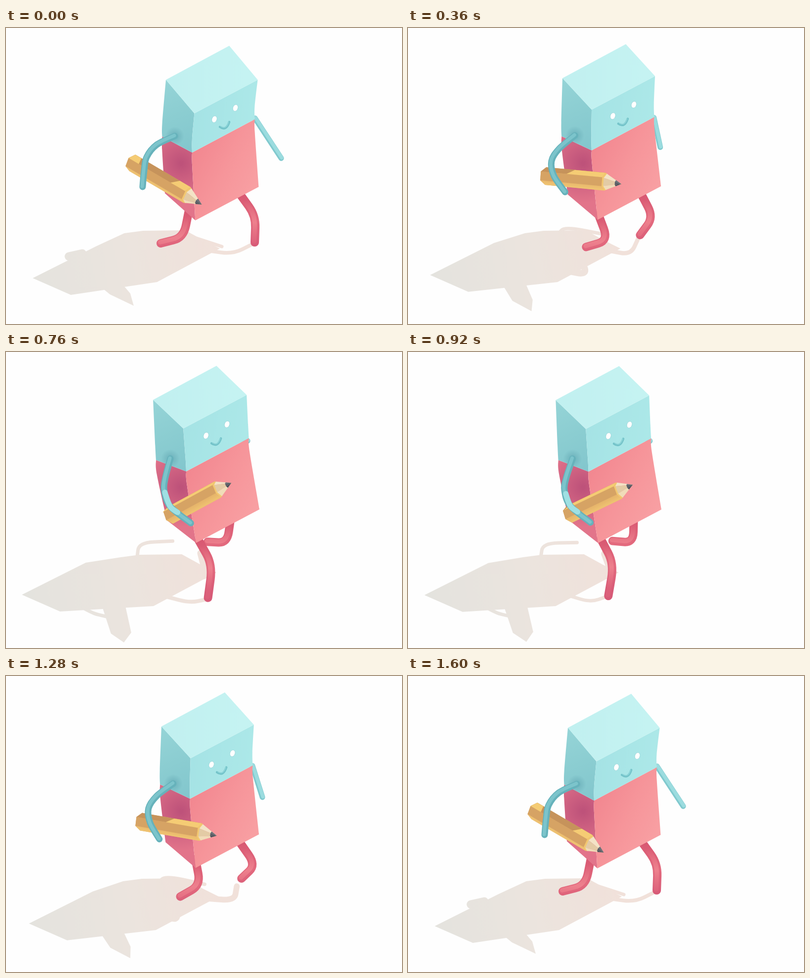
An HTML page with a canvas that plays this animation: 800x600 px, repeating every 1640 ms.

```html
<!DOCTYPE html>
<html lang="en">
<head>
<meta charset="utf-8">
<title>Walking eraser</title>
<style>
html, body { margin: 0; width: 100%; height: 100%; overflow: hidden; background: #fefefe; }
canvas { display: block; width: 800px; height: 600px; }
</style>
</head>
<body>
<canvas id="stage" width="800" height="600"></canvas>
<script>
const g = document.getElementById('stage').getContext('2d');
const STEP = 40, STEPS = 41, CYCLE = 1600;
const { sin, cos, PI } = Math;

const clamp = v => Math.max(0, Math.min(1, v));
const mix = (a, b, k) => a + (b - a) * k;
const lerp = (p, q, k) => [mix(p[0], q[0], k), mix(p[1], q[1], k)];
// Moves points along one direction by the sway u, from 0 (upright) to 1 (leaning).
const lean = (pts, [dx, dy], u) => pts.map(([x, y]) => [x + dx * u, y + dy * u]);
const shift = (pts, x, y) => lean(pts, [x, y], 1);

function ramp(a, b, ...colors) {
  const r = g.createLinearGradient(...a, ...b);
  colors.forEach((c, i) => r.addColorStop(i / (colors.length - 1), c));
  return r;
}

function glow([x, y], radius, inner, outer) {
  const r = g.createRadialGradient(x, y, 3, x, y, radius);
  r.addColorStop(0, inner);
  r.addColorStop(1, outer);
  return r;
}

function poly(pts, fill) {
  g.beginPath();
  pts.forEach(p => g.lineTo(...p));
  g.closePath();
  g.fillStyle = fill;
  g.fill();
}

function stroke(color, width) {
  g.strokeStyle = color;
  g.lineWidth = width;
  g.stroke();
}

function curve(p) {
  for (let i = 0; i < p.length - 1; i++) {
    const a = p[i - 1] || p[i], b = p[i], c = p[i + 1], d = p[i + 2] || c;
    g.bezierCurveTo(b[0] + (c[0] - a[0]) / 6, b[1] + (c[1] - a[1]) / 6,
      c[0] - (d[0] - b[0]) / 6, c[1] - (d[1] - b[1]) / 6, ...c);
  }
}

function tube(p, color, width) {
  g.beginPath();
  g.moveTo(...p[0]);
  curve(p);
  stroke(color, width);
}

// Two straight parts joined by a rounded corner.
function bent([a, b, c], color, width) {
  g.beginPath();
  g.moveTo(...a);
  g.lineTo(...lerp(b, a, 0.45));
  g.quadraticCurveTo(...b, ...lerp(b, c, 0.45));
  g.lineTo(...c);
  stroke(color, width);
}

// One step rule serves both legs, half a cycle apart.
const nearLeg = { phase: 0, hip: [383, 376], knee: [14, 52], foot: [-19, 84], twist: 8 };
const farLeg = { phase: PI, hip: [467, 338], knee: [18, 46], foot: [-9, 71], twist: 0 };

function pose({ phase, hip, knee, foot, twist }, angle) {
  const a = angle + phase, c = cos(a), s = sin(a), c2 = cos(2 * a);
  const x = hip[0] - 10 * c - 3.5 * c2, y = hip[1] - twist * (0.75 * c - 0.4 * s);
  return {
    lift: 13 * (1 + cos(a - PI / 6)),
    joints: [
      [x, y],
      [x + knee[0] - 19 * c + 3 * s - 6 * c2, y + knee[1] + 3 * c],
      [x + foot[0] - 38 * c, y + foot[1] + 26.5 * cos(a - 3.4) + twist * c2]]
  };
}

function leg({ joints }) {
  const y = joints[0][1];
  bent(joints, ramp([0, y], [0, y + 105], '#d85872', '#e36a7e', '#d75a77'), 17);
  bent(shift(joints, -1, -2), ramp([0, y + 12], [0, y + 100],
    'rgba(242,138,148,0)', 'rgba(242,138,148,.7)', 'rgba(230,110,130,.3)'), 9);
}

function legShadow({ joints, lift }, tone) {
  const heights = [113, 78 - 0.4 * lift, lift];
  bent(joints.map(([x, y], i) => [x - 0.6 * heights[i], y + heights[i]]), tone, 7 + lift * 0.3);
}

function shadow(u, legs) {
  const tone = ramp([50, 510], [430, 430], '#e4e3de', '#ebe4de', '#f1e1da');
  poly([
    ...lean([[109, 526], [32, 492], [161, 427]], [22, 15], u),
    ...lean([[232, 416], [270, 411], [355, 410], [393, 431], [425, 447], [298, 515]], [7, 0], u)], tone);
  const [a, b] = lean([[195, 518], [241, 514]], [-7, 4], u);
  const [c, d] = lean([[212, 571], [253, 569]], [-2, -31], u);
  const [tip] = lean([[238, 589]], [20, -26], u);
  poly([a, c, tip, d, b], tone);
  bent([[mix(264, 330, u), 420], [mix(268, 350, u), mix(386, 415, u)], [mix(336, 436, u), mix(383, 443, u)]], tone, 7);
  tube(lean([[150, 516], [178, 530], [206, 537]], [45, -20], u), tone, 7);
  tube(lean([[190, 472], [163, 478]], [-36, -15], u), tone, 17);
  legs.forEach(l => legShadow(l, tone));
}

function panel(left, right, fill) {
  g.beginPath();
  g.moveTo(...left[0]);
  curve(left);
  g.lineTo(...right[right.length - 1]);
  curve(right.slice().reverse());
  g.closePath();
  g.fillStyle = fill;
  g.fill();
}

// Upper and lower half of a bending edge, smooth at the seam.
function halves(a, b, c) {
  const x = (c[0] - a[0]) * 0.06, y = (c[1] - a[1]) * 0.12;
  return [[a, [b[0] - x, b[1] - y], b], [b, [b[0] + x, b[1] + y], c]];
}

function body(u) {
  const [A, B] = lean([[297, 97], [425, 28]], [26, 8], u);
  const [C, D] = lean([[486, 87], [358, 155]], [22.5, 18], u);
  const [E] = lean([[303, 219]], [12.5, 1], u);
  const [F, G] = lean([[364, 242], [490.5, 174.5]], [12, 10.5], u);
  const [H, I] = lean([[384, 387], [512, 319]], [-1.5, 3], u);
  const [J] = lean([[325, 341]], [-4, -6], u);
  const [l1, l2] = halves(A, E, J), [m1, m2] = halves(D, F, H), [r1, r2] = halves(C, G, I);
  panel(l2, m2, glow([354, 274], 80, '#be527a', '#e2748a'));
  panel(m2, r2, ramp(F, I, '#f28790', '#f6959a', '#f8a0a3'));
  panel(l1, m1, ramp(A, F, '#95d4d7', '#8bcdd1', '#82c6cd'));
  panel(m1, r1, ramp(D, G, '#a5e3e5', '#ace8e8'));
  poly([A, B, C, D], ramp(A, C, '#c1f0f0', '#c5f3f2'));
}

function face(u) {
  const [e1, e2, a, b, c] = lean([[404, 169.5], [446.5, 146.5], [415, 185], [428, 194], [434, 175]], [17, 15.5], u);
  for (const [x, y] of [e1, e2]) {
    g.beginPath();
    g.ellipse(x, y, 5, 6.8, 0.35, 0, 7);
    g.fillStyle = '#fff';
    g.fill();
    stroke('rgba(110,185,192,.4)', 1);
  }
  g.beginPath();
  g.moveTo(...a);
  g.quadraticCurveTo(...b, ...c);
  stroke('#74c3c9', 4.5);
  g.beginPath();
  g.moveTo(a[0] + 2, a[1] - 1);
  g.quadraticCurveTo(b[0], b[1] - 3, c[0] - 1, c[1]);
  stroke('#8dd4d8', 1.8);
}

function pencil(u) {
  const len = mix(145, 169, u), yellow = '#f5cc74';
  // Four visible corners of a hexagon that rolls with the sway
  const corners = [-90, -30, 30, 90].map(d => {
    const a = (d + 30 * u - 15) * PI / 180;
    return { v: 18 * sin(a) - 1.5, s: 5 - 12 * cos(a) };
  });
  const back = corners.map(({ s, v }) => [s, v]);
  const front = corners.map(({ s, v }) => [0.77 * len + s * 0.6, v]);
  const face = (i, fill, from = back) => poly([from[i], front[i], front[i + 1], from[i + 1]], fill);
  g.save();
  g.translate(mix(392, 323, u), mix(300, 315, u));
  g.rotate(mix(-29, 30.5, u) * PI / 180);
  g.translate(-len / 2, 0);
  poly([...back, ...front.slice().reverse()], '#dba968');
  face(0, '#c6935b');
  face(1, '#d6a364');
  face(2, ramp([0, 4], [0, 18], '#e6b46a', '#f1c673'));
  face(0, yellow, back.map(([s, v], i) => [s + 0.6 * u * len + (i ? -3 : 3), v]));
  g.globalAlpha = clamp((u - 0.75) * 5);
  poly([back[0], [back[0][0] + 14, back[0][1]], [back[1][0] + 24, back[1][1]], back[1]], yellow);
  g.globalAlpha = 1;
  // Rim, wood and lead
  const cone = k => front.map(([s, v]) => lerp([s, v], [len, 0], k));
  poly([...front, ...cone(0.17).reverse()], '#f2c86f');
  const wood = cone(0.08), tip = [len, 0], lead = cone(0.66);
  ['#f3e3c6', '#e3cba5', '#f0dcb8'].forEach((c, i) => poly([wood[i], tip, wood[i + 1]], c));
  ['#6a6f77', '#5a5f68', '#484d57'].forEach((c, i) => poly([lead[i], tip, lead[i + 1]], c));
  g.restore();
}

function nearArm(u) {
  const low = [[332, 216], [322, 256], [320, 281], [332, 313], [374, 347]];
  const high = [[341, 219], [304, 237], [284, 262], [279, 290], [276, 322]];
  const p = low.map((a, i) => {
    const [x, y] = lerp(a, high[i], u);
    return [x - 38 * u * (1 - u) * sin(i * PI / 4), y];
  });
  g.fillStyle = glow(p[0], 19, 'rgba(70,140,155,.35)', 'rgba(70,140,155,0)');
  g.fillRect(p[0][0] - 19, p[0][1] - 19, 38, 38);
  tube(p, '#66b2bb', 13);
  tube(shift(p, -1, -1), 'rgba(138,208,213,.6)', 7);
  g.globalAlpha = clamp((0.45 - u) * 5);
  tube([lerp(p[2], p[3], clamp(0.1 + 2.4 * u)), p[3], lerp(p[3], p[4], 0.36)], '#9fe0e3', 11);
  g.globalAlpha = 1;
}

function farArm(u) {
  const p = [lerp([488, 180], [503, 183], u), lerp([446, 211], [556, 264], u)];
  tube(p, '#80c9ce', 11);
  tube(shift(p, 1, -1), '#9bdcdf', 7);
}

function draw(t) {
  const angle = 2 * PI * t / CYCLE, u = (1 + cos(angle)) / 2;
  const near = pose(nearLeg, angle), far = pose(farLeg, angle);
  g.fillStyle = '#fefefe';
  g.fillRect(0, 0, 800, 600);
  g.lineCap = g.lineJoin = 'round';
  shadow(u, [near, far]);
  farArm(u);
  leg(far);
  leg(near);
  body(u);
  face(u);
  pencil(u);
  nearArm(u);
}

const start = performance.now();
function tick() {
  draw(Math.floor((performance.now() - start) / STEP) % STEPS * STEP);
  requestAnimationFrame(tick);
}
tick();
</script>
</body>
</html>
```
